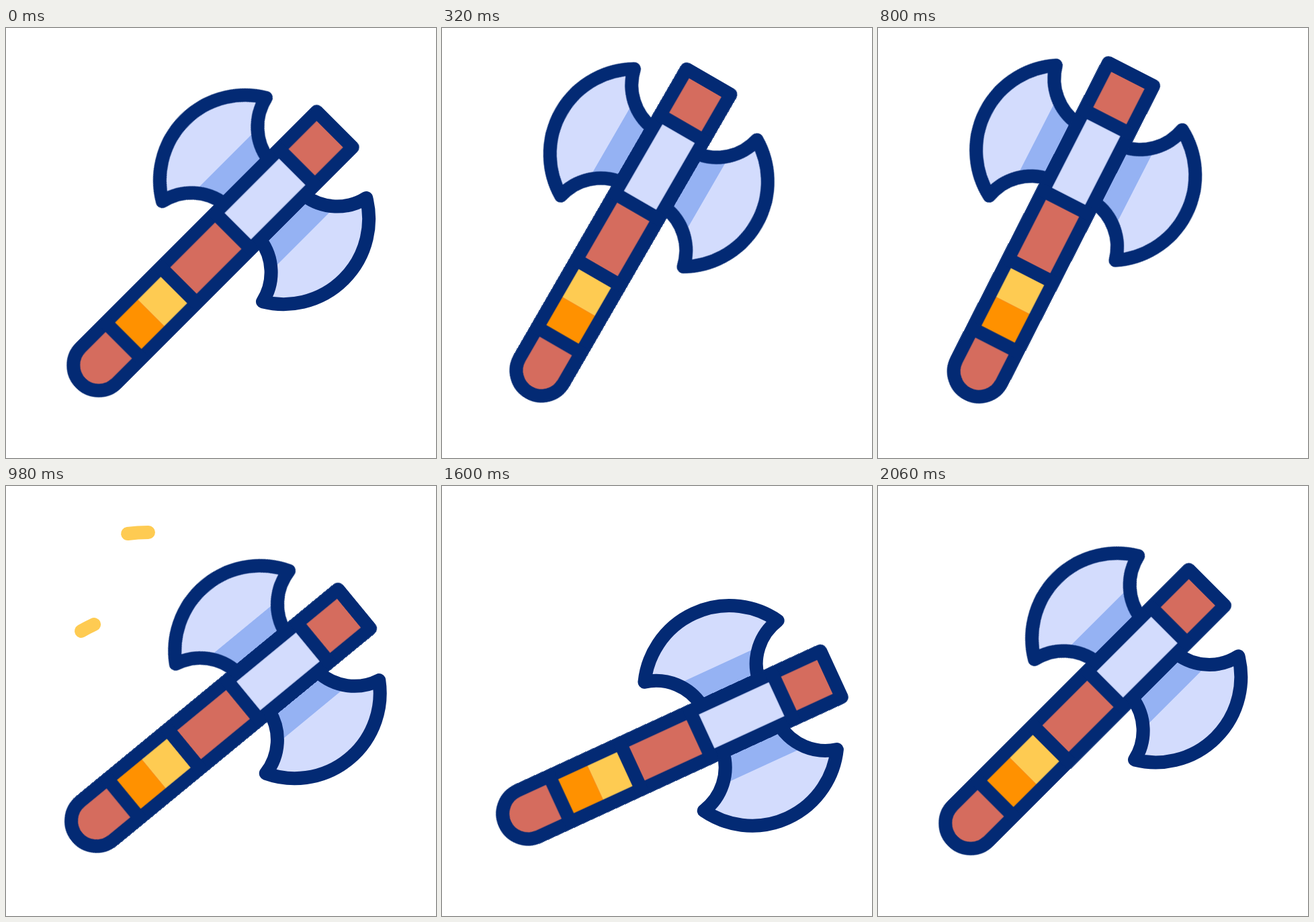
Recreate the animation shown at these times as an HTML page. Size 640x640 px, loop 2.4 s.

```html
<!DOCTYPE html>
<html lang="en">
<head>
<meta charset="utf-8">
<title>Swinging axe</title>
<style>
  /* animating a plain angle keeps the edges crisp: the axe is redrawn, not turned as a bitmap */
  @property --turn { syntax: "<angle>"; inherits: false; initial-value: -45deg; }

  html, body { margin: 0; width: 100%; height: 100%; overflow: hidden; background: #fff; }
  svg { display: block; width: 100%; height: 100%; }

  .line { fill: none; stroke: #032a74; stroke-width: 20; stroke-linecap: round; stroke-linejoin: round; }
  .steel { fill: #d3dcfd; }
  .shade { fill: #95b2f3; }
  .wood { fill: #d56c5e; }
  .gold { fill: #fecb52; }
  .amber { fill: #ff9100; }

  .axe { transform-origin: 0 0; transform: rotate(var(--turn)); animation: swing 2400ms infinite; }
  .trail {
    fill: none; stroke: #fecb52; stroke-width: 20; stroke-linecap: round;
    animation: trail 2400ms linear infinite;
  }

  /* wind up, strike, return, rest */
  @keyframes swing {
    0% { --turn: -45deg; animation-timing-function: cubic-bezier(.32, 0, .11, 1); }
    29.1667% { --turn: -63.9deg; animation-timing-function: cubic-bezier(.75, 0, .16, 1); }
    53.3333% { --turn: -22.05deg; animation-timing-function: cubic-bezier(.8, 0, .7, 1); }
    86.6667%, 100% { --turn: -45deg; }
  }

  /* the head runs ahead, then the tail catches up */
  @keyframes trail {
    0%, 39.16% { opacity: 0; stroke-dasharray: 0 300; stroke-dashoffset: 0; }
    39.17% { opacity: 1; stroke-dasharray: 0 300; stroke-dashoffset: 0; }
    40.8333% { opacity: 1; stroke-dasharray: 31 300; stroke-dashoffset: 0; }
    44.1667% { opacity: 1; stroke-dasharray: 80 300; stroke-dashoffset: -4; }
    49.99% { opacity: 1; stroke-dasharray: 0 300; stroke-dashoffset: -100; }
    50%, 100% { opacity: 0; stroke-dasharray: 0 300; stroke-dashoffset: -100; }
  }
</style>
</head>
<body>
<svg viewBox="0 0 640 640">
  <defs>
    <path id="edge" d="M345.6-37.7A81 81 0 0 1 408.2-105.5A127 127 0 0 0 190-105.5A81 81 0 0 1 252.6-37.7Z"/>
    <clipPath id="inside"><use href="#edge"/></clipPath>
    <g id="blade">
      <use href="#edge" class="steel"/>
      <rect class="shade" x="180" y="-82" width="240" height="45" clip-path="url(#inside)"/>
      <use href="#edge" class="line"/>
    </g>
    <path id="shaft" d="M447-37.7H-49.5A37.7 37.7 0 0 0-49.5 37.7H447Z"/>
  </defs>

  <path class="trail" pathLength="100" d="M181 71A226 226 0 0 1 278 79"/>
  <path class="trail" pathLength="100" d="M112 216A226 226 0 0 1 175 191"/>

  <!-- the axe lies along x, with the pivot at the origin -->
  <g transform="translate(173 467)">
    <g class="axe">
      <use href="#blade"/>
      <use href="#blade" transform="scale(1 -1)"/>
      <use href="#shaft" class="wood"/>
      <rect class="steel" x="233.2" y="-37" width="134.6" height="74"/>
      <rect class="gold" x="60.6" y="-37" width="58.3" height="74"/>
      <rect class="amber" x="2.7" y="-37" width="57.9" height="74"/>
      <use href="#shaft" class="line"/>
      <path class="line" d="M367.8-37V37M233.2-37V37M118.9-37V37M2.7-37V37"/>
    </g>
  </g>
</svg>
</body>
</html>
```
